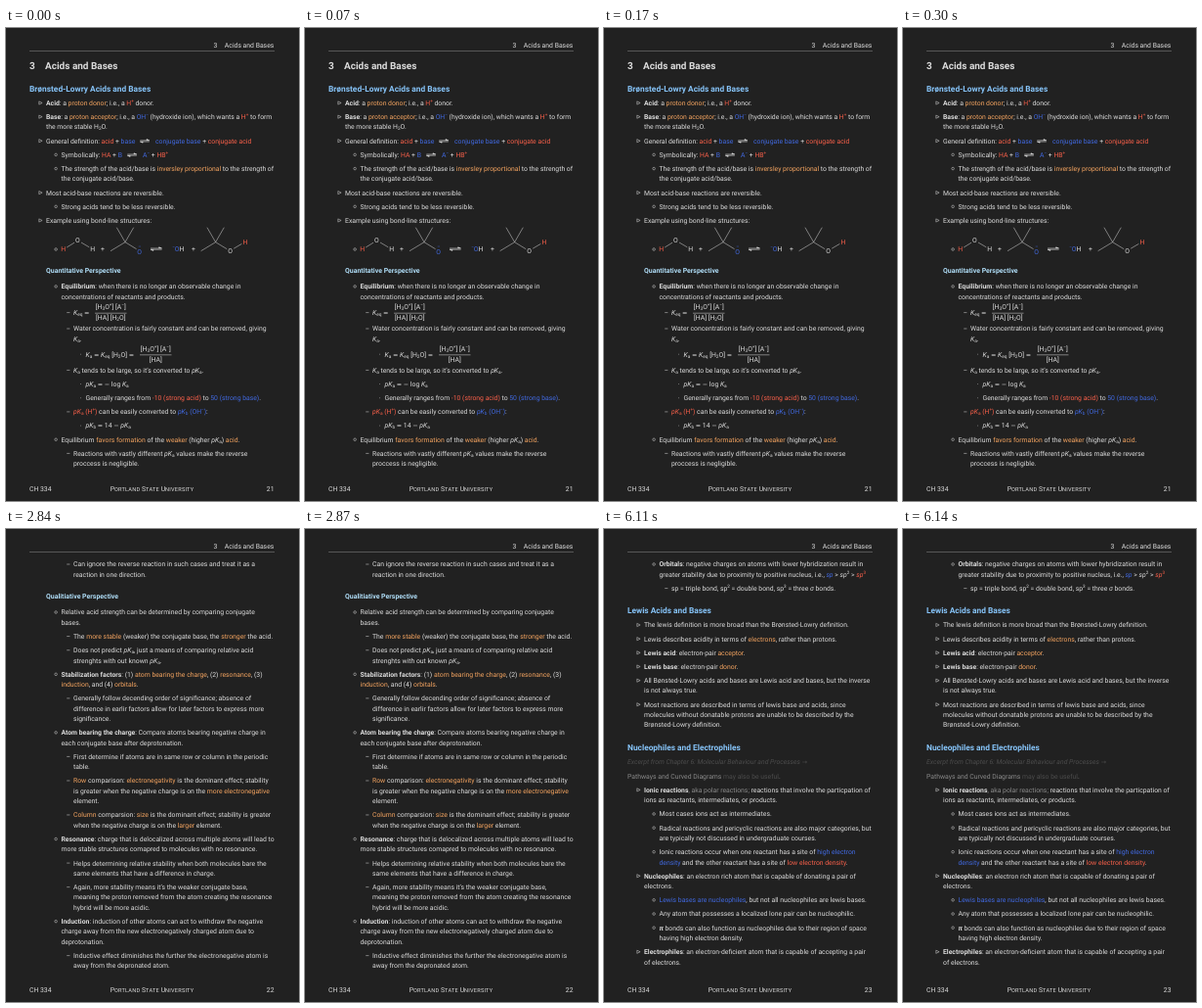
An HTML page for the animation above (8000 ms loop, 300 by 483 pixels).

```html
<!DOCTYPE html>
<html lang="en">
<head>
<meta charset="utf-8">
<style>
html, body { margin: 0; height: 100%; overflow: hidden; background: #212121; }
svg { display: block; width: 100vw; height: 100vh; }
text { font: 6.83px Roboto, sans-serif; fill: #dcdcdc; white-space: pre; text-rendering: geometricPrecision; }
.title { font-size: 10px; font-weight: 700; }
.head { font-size: 8.35px; font-weight: 700; fill: #87c5fa; }
.sub { font-size: 6.95px; font-weight: 700; fill: #b0def8; }
.end { text-anchor: end; }
.mid { text-anchor: middle; }
.b { font-weight: 700; }
.i { font-style: italic; }
.o { fill: #f4a460; }
.r { fill: #f9604a; }
.l { fill: #4169e1; }
.g { fill: #8a8a8a; }
.f { fill: #4c4c4c; }
.u { font-size: .68em; baseline-shift: 2.8px; }
.d { font-size: .7em; baseline-shift: -1px; }
.c { font-size: .82em; letter-spacing: .04em; }
.m { font-family: "DejaVu Sans", sans-serif; font-size: .94em; }
path { fill: none; stroke: #dcdcdc; stroke-width: .5; }
.rule { stroke: #8a8a8a; }
.harpoon { fill: #dcdcdc; stroke-width: .6; }
</style>
</head>
<body>
<svg id="stage" viewBox="0 0 300 483"></svg>
<script>
const LINE = 10.4, ITEM = 14.17;
const INDENT = [0, 41, 56.5, 69, 81.5];

// {x text} styles text with class x; ^c and _c raise and lower one character
function markup(s) {
  s = s.replace(/\^(.)/g, '{u $1}').replace(/_(.)/g, '{d $1}');
  const tag = /\{(\w) ([^{}]*)\}/g;
  while (s.search(tag) >= 0) s = s.replace(tag, '<tspan class="$1">$2</tspan>');
  return s;
}
const text = (x, y, s, cls = '') => `<text x="${x}" y="${y}" class="${cls}">${markup(s)}</text>`;
const path = (d, cls = '') => `<path d="${d}" class="${cls}"/>`;

function bullet(level, y) {
  y -= 2.4;
  return ['',
    path(`M33.8 ${y - 1.6}l3.3 1.6l-3.3 1.6z`),
    path(`M49.8 ${y}a1.3 1.3 0 1 0 2.6 0a1.3 1.3 0 1 0 -2.6 0`),
    path(`M62.2 ${y}h3.2`),
    path(`M76.2 ${y}h.8`)][level];
}

// A leading digit opens an item at that level, a leading space continues it
function rows(y, list) {
  let level, out = '';
  list.forEach((s, n) => {
    if (s[0] > 0) {
      level = +s[0];
      if (n) y += ITEM;
      out += bullet(level, y);
    } else y += LINE;
    out += text(INDENT[level], y, s.slice(1));
  });
  return out;
}

const arrows = (x, y, w) =>
  path(`M${x} ${y - .6}h${w}l-2.8 -1.2v1.2M${x + w} ${y + .6}h${-w}l2.8 1.2v-1.2`, 'harpoon');

function fraction(x, y, w, top, bottom) {
  return text(x + w / 2, y - 4.1, top, 'mid') + text(x + w / 2, y + 6.9, bottom, 'mid') + path(`M${x} ${y}h${w}`);
}

// Central carbon with three methyl bonds and one bond towards oxygen
const butyl = (x, y) => path(`M${x - 15} ${y + 9}L${x} ${y}l-8.7 -15M${x} ${y}l8.7 -15M${x} ${y}l11.6 7`);

const frame = page =>
  text(216.4, 20.4, '3', 'end') + text(274.3, 20.4, 'Acids and Bases', 'end') +
  path('M24 23.5H275', 'rule') +
  text(24, 473.2, 'CH 334') + text(274.5, 473.2, page, 'end') +
  text(149.5, 473.2, 'P{c ORTLAND} S{c TATE} U{c NIVERSITY}', 'mid');

const structures =
  bullet(2, 228.4) +
  text(58.8, 228.4, '{r H}', 'mid') + text(73.4, 219, 'O', 'mid') + text(88.6, 227.8, 'H', 'mid') +
  path('M62.2 224L70 219.2M77 219L85.2 223.8') +
  text(99, 227.6, '+', 'mid') +
  butyl(122, 218.7) + text(136.7, 230.8, '{l O}', 'mid') + text(137, 224.8, '{l {c −}}', 'mid') +
  arrows(148, 225.6, 11.5) +
  text(170.2, 227.6, '{l ^−O}H') + text(192, 227.6, '+', 'mid') +
  butyl(214.6, 218.7) + text(229.6, 229.8, 'O', 'mid') + path('M233.2 225.2L241.4 220.4') +
  text(245, 221.4, '{r H}', 'mid');

const acids = frame('21') +
  text(24, 42.3, '3', 'title') + text(40, 42.3, 'Acids and Bases', 'title') +
  text(24, 64.8, 'Brønsted-Lowry Acids and Bases', 'head') +
  rows(78.9, [
    '1{b Acid}: a {o proton donor}; i.e., a {r H^+} donor.',
    '1{b Base}: a {o proton acceptor}; i.e., a {l OH^−} (hydroxide ion), which wants a {r H^+} to form',
    ' the more stable H_2O.',
    '1General definition: {r acid} + {l base}',
    '2Symbolically: {r HA} + {l B}',
    '2The strength of the acid/base is {o inversley proportional} to the strength of',
    ' the conjugate acid/base.',
    '1Most acid-base reactions are reversible.',
    '2Strong acids tend to be less reversible.',
    '1Example using bond-line structures:']) +
  arrows(137.3, 115.4, 9.5) + text(153, 117.64, '{l conjugate base} + {r conjugate acid}') +
  arrows(124.3, 129.6, 9.5) + text(140, 131.81, '{l A^−} + {r HB^+}') +
  structures +
  text(41, 250.4, 'Quantitative Perspective', 'sub') +
  rows(266.3, [
    '2{b Equilibrium}: when there is no longer an observable change in',
    ' concentrations of reactants and products.']) +
  rows(293, ['3{i K}{d eq} {m =}']) +
  fraction(91, 291.2, 32.5, '[H_3O^+] [A^−]', '[HA] [H_2O]') +
  rows(309.4, ['3Water concentration is fairly constant and can be removed, giving', ' {i K}_a.']) +
  rows(335.6, ['4{i K}_a {m =} {i K}{d eq} [H_2O] {m =}']) +
  fraction(137, 333.8, 32.5, '[H_3O^+] [A^−]', '[HA]') +
  rows(351.8, [
    '3{i K}_a tends to be large, so it’s converted to {i pK}_a.',
    '4{i pK}_a {m =} {m −} log {i K}_a',
    '4Generally ranges from {r -10 (strong acid)} to {l 50 (strong base)}.',
    '3{r {i pK}_a (H^+)} can be easily converted to {l {i pK}_b (OH^−)}:',
    '4{i pK}_b {m =} 14 {m −} {i pK}_a',
    '2Equilibrium {o favors formation} of the {o weaker} (higher {i pK}_a) {o acid}.',
    '3Reactions with vastly different {i pK}_a values make the reverse',
    ' proccess is negligible.']);

const stability = frame('22') +
  rows(38.4, [
    '3Can ignore the reverse reaction in such cases and treat it as a',
    ' reaction in one direction.']) +
  text(41, 71.4, 'Qualitiative Perspective', 'sub') +
  rows(87.4, [
    '2Relative acid strength can be determined by comparing conjugate',
    ' bases.',
    '3The {o more stable} (weaker) the conjugate base, the {o stronger} the acid.',
    '3Does not predict {i pK}_a, just a means of comparing relative acid',
    ' strenghts with out known {i pK}_a.',
    '2{b Stabilization factors}: (1) {o atom bearing the charge}, (2) {o resonance}, (3)',
    ' {o induction}, and (4) {o orbitals}.',
    '3Generally follow decending order of significance; absence of',
    ' difference in earlir factors allow for later factors to express more',
    ' significance.',
    '2{b Atom bearing the charge}: Compare atoms bearing negative charge in',
    ' each conjugate base after deprotonation.',
    '3First determine if atoms are in same row or column in the periodic',
    ' table.',
    '3{o Row} comparison: {o electronegativity} is the dominant effect; stability',
    ' is greater when the negative charge is on the {o more electronegative}',
    ' element.',
    '3{o Column} comparsion: {o size} is the dominant effect; stability is greater',
    ' when the negative charge is on the {o larger} element.',
    '2{b Resonance}: charge that is delocalized across multiple atoms will lead to',
    ' more stable structures comapred to molecules with no resonance.',
    '3Helps determining relative stability when both molecules bare the',
    ' same elements that have a difference in charge.',
    '3Again, more stability means it’s the weaker conjugate base,',
    ' meaning the proton removed from the atom creating the resonance',
    ' hybrid will be more acidic.',
    '2{b Induction}: induction of other atoms can act to withdraw the negative',
    ' charge away from the new electronegatively charged atom due to',
    ' deprotonation.',
    '3Inductive effect diminishes the further the electronegative atom is',
    ' away from the depronated atom.']);

const lewis = frame('23') +
  rows(38.4, [
    '2{b Orbitals}: negative charges on atoms with lower hybridization result in',
    ' greater stability due to proximity to positive nucleus, i.e., {l {i sp}} > {i sp}^2 > {r {i sp}^3}',
    '3sp = triple bond, sp^2 = double bond, sp^3 = three {i σ} bonds.']) +
  text(24, 86.2, 'Lewis Acids and Bases', 'head') +
  rows(100.4, [
    '1The lewis definition is more broad than the Brønsted-Lowry definition.',
    '1Lewis describes acidity in terms of {o electrons}, rather than protons.',
    '1{b Lewis acid}: electron-pair {o acceptor}.',
    '1{b Lewis base}: electron-pair {o donor}.',
    '1All Bønsted-Lowry acids and bases are Lewis acid and bases, but the inverse',
    ' is not always true.',
    '1Most reactions are described in terms of lewis base and acids, since',
    ' molecules without donatable protons are unable to be described by the',
    ' Brønsted-Lowry definition.']) +
  text(24, 226.1, 'Nucleophiles and Electrophiles', 'head') +
  text(24, 240.4, '{f {i Excerpt from Chapter 6: Molecular Behaviour and Processes} {m →}}') +
  text(24, 254.6, '{g Pathways and Curved Diagrams} {f may also be useful}{g .}') +
  rows(268.8, [
    '1{b Ionic reactions}{g , aka polar reactions;} reactions that involve the particpation of',
    ' ions as reactants, intermediates, or products.',
    '2Most cases ions act as intermediates.',
    '2Radical reactions and pericyclic reactions are also major categories, but',
    ' are typically not discussed in undergraduate courses.',
    '2Ionic reactions occur when one reactant has a site of {l high electron}',
    ' {l density} and the other reactant has a site of {r low electron density}.',
    '1{b Nucleophiles}: an electron rich atom that is capable of donating a pair of',
    ' electrons.',
    '2{l Lewis bases are nucleophiles}, but not all nucleophiles are lewis bases.',
    '2Any atom that possesses a localized lone pair can be nucleophilic.',
    '2{b {i π}} bonds can also function as nucleophiles due to their region of space',
    ' having high electron density.',
    '1{b Electrophiles}: an electron-deficient atom that is capable of accepting a pair',
    ' of electrons.']);

const stage = document.getElementById('stage');
stage.innerHTML = [acids, stability, lewis].map(p => `<g>${p}</g>`).join('');
const pages = [...stage.children];

function draw(now) {
  const t = now % 8000;
  const current = t < 2840 ? 0 : t < 6110 ? 1 : 2;
  pages.forEach((p, n) => p.style.display = n === current ? '' : 'none');
}
const start = performance.now();
function tick() {
  draw(performance.now() - start);
  requestAnimationFrame(tick);
}
tick();
</script>
</body>
</html>
```
